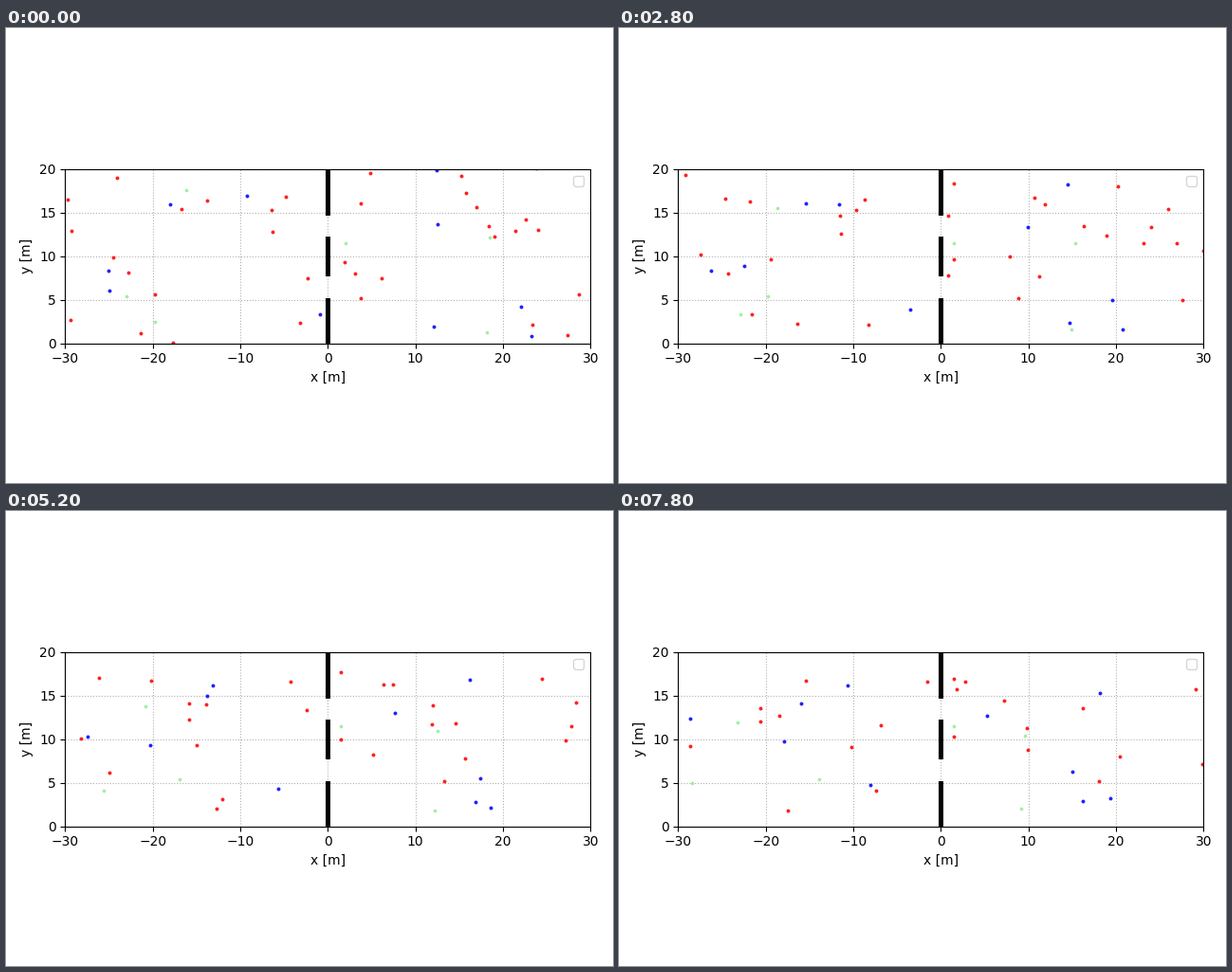
Recreate the animation shown at these times as a matplotlib script. Size 640 by 480 pixels, loop 8 s.

```python
import numpy as np
import matplotlib.pyplot as plt
from matplotlib.animation import FuncAnimation

WIDTH, HEIGHT, DPI = 640, 480, 100
FRAMES, INTERVAL = 40, 200
LEFT, BOTTOM, BOX_W, BOX_H = 62.3, 147.4, 554, 184   # plot box in pixels
WALLS = ((0, 5), (8, 12), (15, 20))
STANDOFF, SLOW_ZONE = 1.5, 2.0                        # metres from the wall

# Each walker: start x, y in stage pixels and heading in degrees.
RED_EAST = [
    (65, 181, 1), (113, 242, -3), (142, 322, 12), (212, 182, 1),
    (318, 264, 6), (368, 259, 23), (396, 264, 2), (374, 285, 0),
    (480, 156, -14), (509, 209, -22), (515, 220, 12), (548, 202, -32),
    (559, 148, -65), (604, 281, 75), (555, 313, 34), (592, 324, 57),
]
RED_WEST = [
    (69, 214, 255), (68, 308, 108), (117, 158, 176), (129, 258, 156),
    (157, 281, 152), (176, 332, 140), (185, 191, 170), (280, 192, 187),
    (295, 178, 197), (281, 215, 183), (310, 311, 182), (357, 247, 172),
    (374, 185, 202), (384, 153, 197), (485, 174, 186), (496, 189, 176),
    (537, 214, 174), (561, 213, 187),
]
BLUE = [
    (109, 277, 120), (108, 256, 11), (173, 186, 2), (254, 177, 203),
    (331, 302, 169), (455, 207, 188), (454, 150, -39), (451, 315, 10),
    (554, 325, 164), (543, 294, 164),
]
GREEN = [
    (190, 171, 219), (127, 283, 0), (157, 310, 164),
    (358, 227, 180), (510, 221, 191), (507, 321, 175),
]


def to_metres(x, y):
    return ((x - LEFT) / BOX_W * 60 - 30,
            (HEIGHT - y - BOTTOM) / BOX_H * 20)


def at_wall(y):
    return np.any([(y >= low) & (y <= high) for low, high in WALLS], axis=0)


def walk(walkers, speed):
    """Steady walkers that slow before the wall and only pass at a door."""
    x, y, heading = np.array(walkers, dtype=float).T
    x, y = to_metres(x, y)
    heading = np.radians(heading)
    stride = speed * INTERVAL / 1000
    side = np.sign(np.cos(heading))
    track = []
    for _ in range(FRAMES):
        track.append(np.column_stack([x, y]))
        gap = -side * x
        pace = np.where((gap > 0) & (gap < SLOW_ZONE), 0.5, 1) * stride
        ahead = x + pace * np.cos(heading)
        blocked = (gap > 0) & (-side * ahead < STANDOFF) & at_wall(y)
        x = np.where(blocked, -side * STANDOFF, ahead)
        y = y + pace * np.sin(heading)
    return track


fig = plt.figure(figsize=(WIDTH / DPI, HEIGHT / DPI), dpi=DPI)
ax = fig.add_axes([LEFT / WIDTH, BOTTOM / HEIGHT,
                   BOX_W / WIDTH, BOX_H / HEIGHT])
ax.set(xlim=(-30, 30), ylim=(0, 20), xlabel="x [m]", ylabel="y [m]")
ax.set_xticks(range(-30, 31, 10))
ax.set_yticks(range(0, 21, 5))
ax.grid(linestyle=":")
ax.legend([], [], loc="upper right")

for low, high in WALLS:
    ax.plot([0, 0], [low, high], color="black", lw=3.6,
            solid_capstyle="projecting")

crowds = []
for walkers, speed, colour, size in ((RED_EAST + RED_WEST, 1.83, "red", 8),
                                     (BLUE, 0.94, "blue", 8),
                                     (GREEN, 1.16, "lightgreen", 7)):
    track = walk(walkers, speed)
    dots = ax.scatter(*track[0].T, s=size, c=colour, alpha=0.87,
                      linewidths=0, zorder=2.2)
    crowds.append((dots, track))


def update(step):
    for dots, track in crowds:
        dots.set_offsets(track[step])
    return [dots for dots, _ in crowds]


anim = FuncAnimation(fig, update, frames=FRAMES, interval=INTERVAL,
                     repeat=True, repeat_delay=0, blit=False)
plt.show()
```
